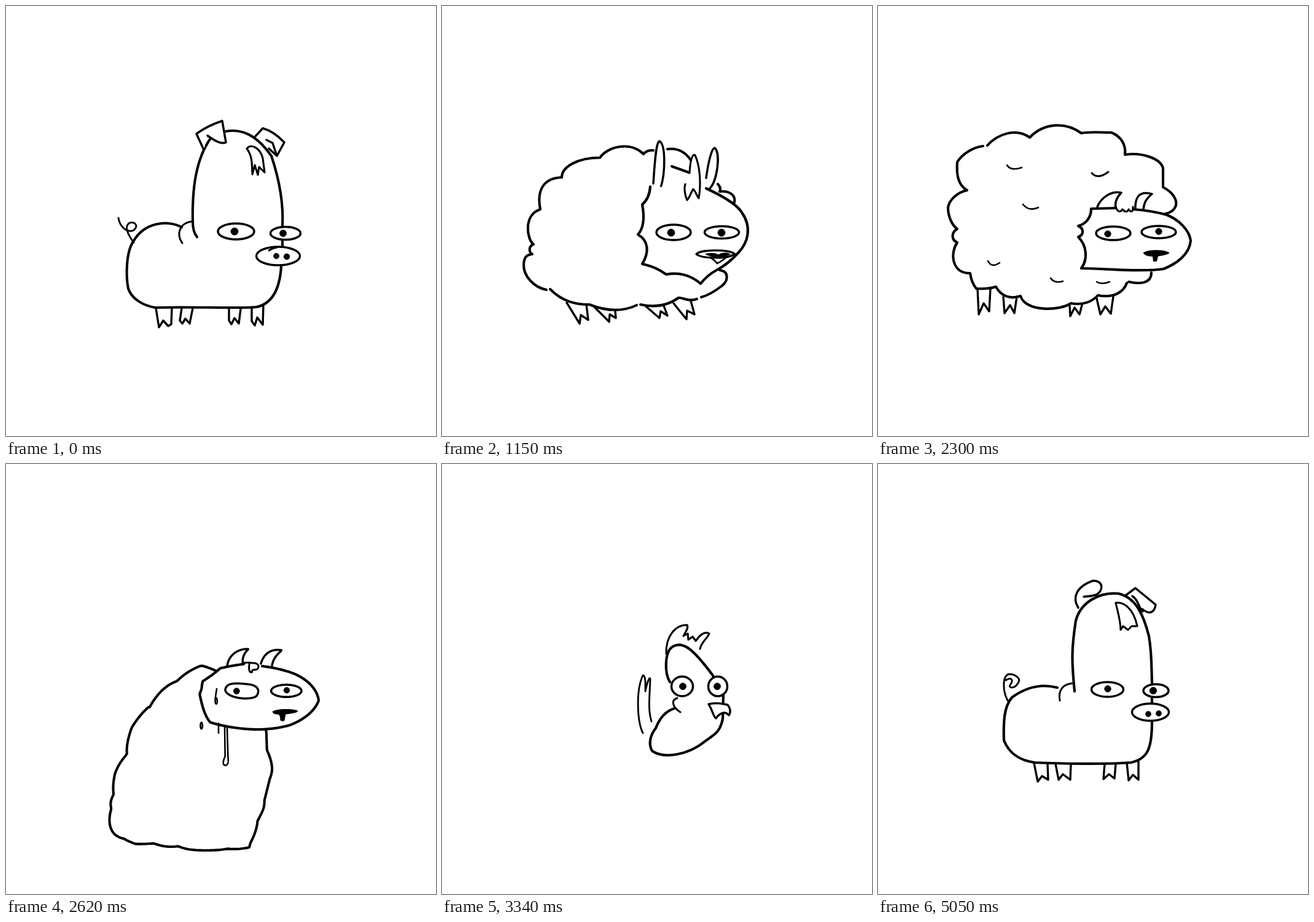
Recreate the animation shown at these times as an HTML page with a canvas. Size 700 by 700 pixels, loop 5130 ms.

```html
<!DOCTYPE html>
<html lang="en">
<head>
<meta charset="utf-8">
<title>Shape-shifting animals</title>
<style>
html, body { margin: 0; width: 100%; height: 100%; overflow: hidden; background: #fff; }
canvas { display: block; }
</style>
</head>
<body>
<canvas id="stage" width="700" height="700"></canvas>
<script>
const ctx = document.getElementById('stage').getContext('2d');
const LOOP = 5130, STEP = 80, SAMPLES = 240;

const ring = (x, y, rx, ry = rx) =>
  `M${x - rx} ${y}A${rx} ${ry} 0 1 1 ${x + rx} ${y}A${rx} ${ry} 0 1 1 ${x - rx} ${y}Z`;

// Drawing order, with line width and fill of every part.
const styles = {
  tail: [2.9], wingR: [3], body: [4.1], earL: [3.5, '#fff'], earR: [3.5, '#fff'], earFold: [3.4],
  head: [4.2, '#fff'], hair: [3.1], fold: [3], wing: [3.1],
  leg1: [3.4], leg2: [3.4], leg3: [3.4], leg4: [3.4],
  curl1: [2.6], curl2: [3], curl3: [2.6], curl4: [2.6], curl5: [2.6], curl6: [2.6],
  drip1: [2.6], drip2: [2.6], drip3: [2.6], drip4: [2.6],
  eyeL: [3.5, '#fff'], eyeR: [3.5, '#fff'], pupilL: [.8, '#000'], pupilR: [.8, '#000'],
  mouth: [3.4, '#fff'], lip: [2.8], nose: [2.2, '#000'],
  nostrilL: [.8, '#000'], nostrilR: [.8, '#000']
};

const pig = {
  tail: 'M208 385C200 375 195 364 197 358C201 349 212 352 212 359C209 368 201 368 193 363C187 358 184 352 183 345',
  body: 'M311 376C306 370 304 362 304 351C303 300 308 250 334 214M358 204C392 198 415 220 432 244C444 280 452 320 450 358L450 395L448 424C446 455 436 484 408 490C380 493 300 489 243 491C225 488 205 478 199 460C195 440 195 400 208 382C226 352 262 348 286 360',
  earL: 'M322 234L310 208Q328 195 352 187L358 222C350 226 338 218 328 211',
  earR: 'M406 212L418 199Q436 204 453 222L441 244L428 232',
  earFold: 'M424 218L434 223L440 241',
  hair: 'M392 232C400 223 414 232 418 248L421 271L412 262L410 275L405 259L401 274C400 258 402 246 392 232',
  fold: 'M287 386C277 372 282 354 301 351',
  leg1: 'M244 492L249 523L256 512L264 521L269 518L270 492',
  leg2: 'M286 492L283 512L287 517L292 509L299 517L304 492',
  leg3: 'M363 493L363 512L367 518L372 508L379 517L382 493',
  leg4: 'M400 490L400 513L405 520L409 507L418 519L419 487',
  eyeL: ring(374.5, 367, 29.5, 13), eyeR: ring(455, 370, 24.5, 10.5),
  pupilL: ring(372, 367, 6), pupilR: ring(451, 370, 5.5),
  mouth: ring(443, 407, 35.5, 15), lip: 'M428 398Q434 394 441 393',
  nostrilL: ring(440, 407, 4.5), nostrilR: ring(457, 408, 4.8)
};

const woolly = {
  body: 'M195 279C195 262 220 247 257 247C270 228 308 220 328 241Q334 234 344 235M367 233C385 230 398 240 405 251M374 261L402 271M449 290Q455 296 452 302C470 300 480 310 475 322M452 430C468 432 466 448 455 456C442 466 430 472 422 474M415 477C400 482 392 474 385 475C370 486 350 492 323 486M317 487C300 495 275 500 240 486C215 486 195 480 176 461M170 462C150 458 132 440 133 420C134 408 138 405 147 404C140 400 142 390 149 388C138 380 132 340 160 331C154 300 165 280 195 279',
  earL: 'M344 289C346 260 348 222 354 220C364 225 364 270 356 296',
  earR: 'M430 280C434 250 440 230 444 231C454 240 448 285 436 297',
  head: 'M430 297C450 306 480 322 488 336C505 360 498 385 483 401Q466 420 447 430Q432 438 421 452C405 438 385 433 365 437C355 430 345 424 326 420C338 400 336 382 319 372C328 362 330 345 326 323C332 318 338 310 339 294',
  hair: 'M403 272C404 250 408 240 412 243C420 260 422 290 418 313C414 308 412 300 409 298C406 302 403 312 399 316C395 308 394 296 396 290',
  leg1: 'M203 483L224 517L226 503L238 511L235 486',
  leg2: 'M248 490L272 514L273 502L283 508L282 497',
  leg3: 'M332 489L354 508L356 497L367 504L361 488',
  leg4: 'M377 484L398 510L399 496L411 502L405 480',
  eyeL: ring(377, 368.5, 28, 12.5), eyeR: ring(455.5, 368.5, 28, 10),
  pupilL: ring(373, 369, 6), pupilR: ring(455, 369, 6),
  mouth: 'M414 404C420 396 465 396 476 403C470 412 425 412 414 404Z',
  lip: 'M436 409Q442 412 448 419Q455 416 464 408',
  nose: 'M430 404C440 402 446 403 450 406C456 402 462 402 468 404C460 407 455 410 449 409C440 408 436 406 430 404Z'
};

const sheep = {
  body: 'M178 227C195 208 225 198 247 214C270 190 305 188 331 207C345 204 365 206 380 206C395 212 404 225 402 242C430 238 460 248 464 264V295C480 303 487 315 485 325C482 333 475 337 468 338M445 434C445 450 430 454 408 449M405 451C400 465 385 476 358 471C350 480 335 488 314 484C297 496 240 499 232 472C215 478 200 472 192 457Q180 461 160 460Q152 450 150 435C118 435 118 400 129 385C118 380 120 368 129 363C122 358 114 345 114 328C116 315 130 303 145 300C128 290 128 270 129 254C138 240 155 230 171 228',
  earL: 'M357 327C363 312 380 300 396 304C388 312 385 320 387 330',
  earR: 'M419 331C418 312 425 300 446 306C435 315 433 322 432 331',
  head: 'M415 331Q445 333 470 340C490 348 507 365 509 382C507 405 485 420 465 428C430 433 380 428 331 427C342 412 340 390 326 376C336 372 335 362 326 358C338 355 347 345 347 330L387 329',
  hair: 'M415 327C416 335 412 337 408 331C406 336 402 336 398 331C394 337 389 335 387 326',
  leg1: 'M162 461L164 502L172 484L181 497L183 460',
  leg2: 'M204 474L206 500L215 487L222 500L226 473',
  leg3: 'M312 488L313 505L320 491L328 502L332 487',
  leg4: 'M356 476L362 502L370 489L379 501L383 473',
  curl1: 'M210 259Q216 269 234 263', curl2: 'M348 272Q358 283 375 270',
  curl3: 'M236 323Q246 335 261 328', curl4: 'M179 415Q185 427 198 418',
  curl5: 'M281 443Q287 452 301 448', curl6: 'M356 449Q364 454 377 449',
  eyeL: ring(383, 370, 28, 11), eyeR: ring(457, 368, 28, 10),
  pupilL: ring(374, 371, 5.2), pupilR: ring(457, 367, 5.2),
  nose: 'M433 402C441 397 465 397 473 402C465 406 455 406 455 407L453 415H449L448 407C440 406 436 406 433 402Z'
};

const dripping = {
  body: 'M317 462C322 445 320 458 326 463C333 463 335 440 334 420M372 430V678L361 688M344 692L337 681L320 686C310 680 297 660 295 630C295 600 308 560 315 505C318 500 316 490 317 462',
  earL: 'M362 327C363 310 378 300 394 300C385 308 383 318 386 326',
  earR: 'M413 322C420 306 436 300 451 302C440 310 434 320 433 331',
  head: 'M418 328Q424 329 434 331C475 340 505 358 509 386C495 412 460 428 425 432C400 436 360 430 335 418C310 410 306 385 312 359C320 342 355 330 387 324',
  hair: 'M387 323C384 335 388 342 396 342C398 334 405 336 412 334C420 330 418 322 410 319C400 318 392 320 387 323Z',
  drip1: 'M356 428L357 500C350 515 352 522 358 522C366 520 365 510 364 500L362 430',
  drip2: 'M346 422V446',
  drip3: ring(319, 426, 2.5, 8),
  drip4: 'M343 366C340 385 337 402 342 403C346 400 344 390 342 388',
  eyeL: 'M358 368C357 352 375 356 395 358C412 359 412 370 409 378C405 385 366 384 358 368Z',
  eyeR: ring(456, 370, 23, 10),
  pupilL: ring(376, 369, 4.8), pupilR: ring(457, 369, 4.5),
  nose: 'M436 404C445 400 465 400 476 403C465 406 455 406 454 407L452 419H447L446 407C440 407 436 407 436 404Z'
};

const melting = {
  ...dripping,
  body: 'M262 480C280 430 300 415 330 395L400 425C403 500 405 600 418 698L344 697L215 698C185 690 188 660 200 620C215 570 240 520 262 480'
};

const hatching = {
  tail: 'M341 419C335 400 338 380 339 350C338 345 334 355 331 370C331 360 332 344 327 344C315 370 318 420 327 438',
  body: 'M330 900H372V1000H330Z',
  head: 'M371 355C362 340 362 305 376 297C392 288 408 300 440 343L458 375L457 415C453 435 445 440 430 450C400 475 360 480 342 467C335 455 340 440 348 430C355 412 365 402 378 398',
  hair: 'M420 301C422 290 432 284 435 276C428 272 420 278 413 288L408 281L401 286L400 276L393 280C395 275 402 268 399 262C380 262 364 280 365 309',
  fold: 'M383 381C373 384 374 395 388 404',
  eyeL: ring(391, 362, 17.5, 16), eyeR: ring(449, 362, 15.5, 16),
  pupilL: ring(392, 362, 5.5), pupilR: ring(448, 362, 5.5),
  mouth: 'M434 391C445 388 455 390 465 392C470 398 470 405 467 409C460 400 450 408 446 414C442 412 440 400 434 391Z'
};

const chicken = {
  tail: 'M344 418C345 390 346 360 334 344C315 336 292 360 291 385C294 396 310 390 320 377C305 395 308 410 318 409C325 405 327 395 326 387C330 410 334 425 340 430',
  wingR: 'M441 428C455 432 452 442 434 455',
  head: 'M398 411L394 376L393 320C394 285 408 288 416 288C430 292 434 305 435 350L439 400C440 430 435 458 424 466H390C365 464 340 452 336 441C335 425 360 410 384 408',
  hair: 'M412 284C390 274 362 280 352 295C350 305 358 309 377 303C360 310 356 328 367 326C375 326 376 320 378 318C362 335 366 346 378 346Q389 342 393 330',
  fold: 'M398 393C388 396 380 408 387 418',
  wing: 'M382 425C395 424 400 432 397 440C388 450 360 448 351 440C349 432 368 432 382 436',
  leg2: 'M367 464L364 500L386 502',
  leg3: 'M394 470L400 501L428 498',
  eyeL: ring(391, 366, 21, 10), eyeR: ring(440, 359, 21, 9),
  pupilL: ring(391, 366, 6), pupilR: ring(437, 360, 5.5),
  mouth: 'M430 398L434 374L464 389Z'
};

const longLegged = {
  ...chicken,
  leg2: 'M367 464L364 542L386 544',
  leg3: 'M394 470L400 543L428 540'
};

const piglet = {
  tail: 'M211 385C203 370 202 345 213 342C225 342 232 350 229 355C222 368 212 364 215 360C222 350 216 347 208 352',
  earL: 'M326 234C316 218 322 200 350 190C368 190 367 207 355 213Q345 216 335 216',
  earR: 'M403 214L419 202L452 229C450 242 442 246 430 236',
  head: 'M320 370C315 320 315 300 322 255C330 225 360 208 392 211C420 218 432 245 441 280C446 310 445 330 446 355V420C446 465 438 480 412 486C370 489 300 488 255 486C235 483 215 475 205 450C204 420 205 395 218 380C240 364 265 357 292 364',
  earFold: 'M414 215C425 222 424 235 431 240',
  hair: 'M387 226C400 224 416 235 422 264L413 264L407 270L399 264L395 270C395 255 390 240 387 226',
  fold: 'M296 385C293 370 300 357 319 357',
  leg1: 'M254 487L260 517L267 508L277 514L276 487',
  leg2: 'M289 488L294 514L301 505L313 514L314 488',
  leg3: 'M369 488L367 513L376 505L385 512L387 488',
  leg4: 'M405 486L408 515L415 506L424 514L424 484',
  eyeL: ring(373.5, 367, 26, 12), eyeR: ring(452.5, 369, 20.5, 10.5),
  pupilL: ring(374, 366, 5.3), pupilR: ring(448, 369, 5.7),
  mouth: ring(443.5, 404, 30, 14),
  nostrilL: ring(440, 407, 4.5), nostrilR: ring(457, 406, 4.5)
};

// time, pose, shift x, shift y, vertical stretch from the feet
const keys = [
  [670, pig, 0, 0, 1], [910, pig, 0, 0, 1.07], [1150, woolly, 0, 0, 1],
  [1230, sheep, 18, 7, 1], [1470, sheep, 0, 0, 1], [2300, sheep, 0, 0, 1],
  [2780, melting, 0, 0, 1], [2940, dripping, 0, 0, 1], [3340, hatching, 0, 0, 1],
  [3900, longLegged, 0, 0, 1], [3980, chicken, 0, 0, 1], [4650, chicken, 0, 0, 1],
  [5050, piglet, 0, 0, 1]
];
const moves = [[750, 1470], [2300, 3980], [4730, 5050]];

const mix = (a, b, t) => a + (b - a) * t;
const cache = new Map();

function sample(d) {
  if (!cache.has(d)) {
    const path = document.createElementNS('http://www.w3.org/2000/svg', 'path');
    path.setAttribute('d', d);
    const length = path.getTotalLength();
    const points = Array.from({ length: SAMPLES + 1 }, (_, i) => path.getPointAtLength(length * i / SAMPLES));
    cache.set(d, { points, gap: length / SAMPLES + 4 });
  }
  return cache.get(d);
}

// A part missing from one pose grows out of its first point, or shrinks quickly into it.
function morph(from, to, t) {
  const a = sample(from || to), b = sample(to || from);
  const near = t < .5 ? a : b;
  const amount = to ? t : t * 3;
  const path = new Path2D();
  if (amount >= 1) return path;
  for (let i = 0; i <= SAMPLES; i++) {
    const p = a.points[from ? i : 0], q = b.points[to ? i : 0];
    const n = near.points[i], last = near.points[i - 1];
    const jump = !last || Math.hypot(n.x - last.x, n.y - last.y) > near.gap;
    path[jump ? 'moveTo' : 'lineTo'](mix(p.x, q.x, amount), mix(p.y, q.y, amount));
  }
  return path;
}

function snap(time) {
  const move = moves.filter(([start]) => time >= start).pop();
  if (!move) return keys[0][0];
  const [start, end] = move;
  return Math.min(end, start + Math.floor((time - start) / STEP) * STEP);
}

function draw(time) {
  const now = snap(time);
  const i = Math.min(keys.length - 2, keys.findLastIndex(key => key[0] <= now));
  const [t0, from, ...placeA] = keys[i], [t1, to, ...placeB] = keys[i + 1];
  const t = (now - t0) / (t1 - t0);
  const [dx, dy, stretch] = placeA.map((v, k) => mix(v, placeB[k], t));

  ctx.setTransform(1, 0, 0, 1, 0, 0);
  ctx.fillStyle = '#fff';
  ctx.fillRect(0, 0, 700, 700);
  ctx.setTransform(1, 0, 0, stretch, dx, dy + 525 * (1 - stretch));
  ctx.lineCap = ctx.lineJoin = 'round';
  ctx.strokeStyle = '#000';

  for (const [part, [width, fill]] of Object.entries(styles)) {
    const a = from[part], b = to[part];
    const still = t === 0 || a === b ? a : t === 1 ? b : null;
    if (still === undefined) continue;
    const path = still ? new Path2D(still) : morph(a, b, t);
    ctx.lineWidth = width;
    if (fill) { ctx.fillStyle = fill; ctx.fill(path); }
    ctx.stroke(path);
  }
}

const begin = performance.now();
function tick() {
  draw((performance.now() - begin) % LOOP);
  requestAnimationFrame(tick);
}
tick();
</script>
</body>
</html>
```
